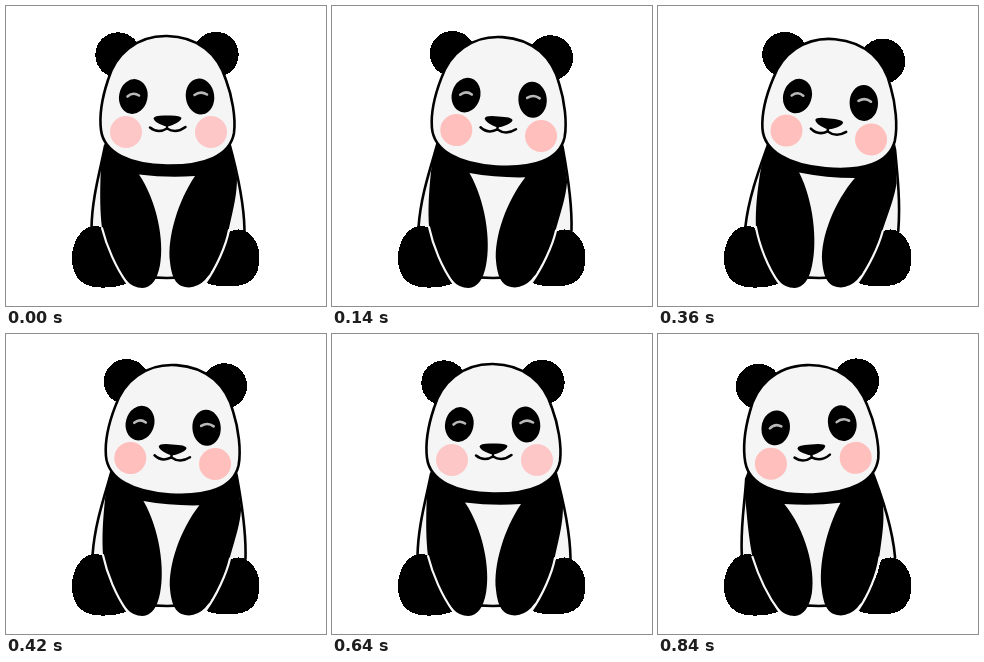
An HTML page that plays this animation: 320x300 px, repeating every 0.98 s.

```html
<!DOCTYPE html>
<html lang="en">
<head>
<meta charset="utf-8">
<title>Swaying panda</title>
<style>
  html, body { margin: 0; width: 100%; height: 100%; overflow: hidden; background: #fff; }
  svg { display: block; width: 320px; height: 300px; }
  .crisp { shape-rendering: crispEdges; }
  .skin { fill: #f5f5f6; stroke: #000; stroke-width: 2.6; }
  .line { fill: none; stroke-linecap: round; stroke-linejoin: round; }
  .gap { stroke: #f8f8f8; stroke-width: 2.2; }
  .mouth { stroke: #000; stroke-width: 2.5; }
  .glint { stroke: #b9b9b9; stroke-width: 2.6; }
</style>
</head>
<body>
<svg viewBox="0 0 320 300">
  <path class="skin bend" d="M108,124 L99,140 C94,165 86,192 85.500,222 L96,262 Q160,282 228,262 L238.500,224 C238,195 231,165 223,136 L217,122 Z"/>

  <!-- legs stay planted -->
  <g class="crisp">
    <path d="M97,222 C81,214 66,231 66,252 C66,274 79,281.500 95,281.500 Q112,282 121,277 C110,262 101,240 97,222 Z"/>
    <path d="M223,226 C239,217 253.500,233 253.500,251 C253.500,272 243,279.500 228,280 Q210,281 200,277 C210,262 220,242 223,226 Z"/>
  </g>

  <!-- collar and both arms -->
  <path class="bend" d="M108,124 L99,140 C95,152 95,160 94.500,172 C94,190 94,205 96,222 C101,240 110,262 120,274 Q127,282 136.500,282 Q150,281 154,259 C158.500,235 151,195 133,168.500 Q161,172 189,170 C172,195 161,232 164,256 C166,275 172,281 183,281.500 Q192,281 199,274 C210,262 220,240 223,222 C228,200 231,188 231,172 L223,136 L217,122 Z"/>
  <path class="line gap bend" d="M96,222 C100.500,240 110,262 121,277"/>
  <path class="line gap bend" d="M223,224 C220,240 210,262 200,276"/>

  <g id="shell">
    <g class="crisp">
      <circle cx="112" cy="49" r="22.700"/>
      <circle cx="210" cy="48.500" r="22.700"/>
    </g>
    <path class="skin" d="M161,30 C130,29.500 109,49 102,74 C96,92 93,108 95,124 C98,147 124,159 161,159.500 C198,160 224,150 228,127 C230,112 226,90 220,74 C212,48 192,30.500 161,30 Z"/>
  </g>

  <g id="face">
    <g id="cheeks">
      <circle cx="120" cy="126" r="16"/>
      <circle cx="205" cy="126" r="16"/>
    </g>
    <ellipse cx="127.300" cy="90.500" rx="14.200" ry="17.500" transform="rotate(12 127.300 90.500)"/>
    <ellipse cx="194" cy="90.500" rx="14.200" ry="18" transform="rotate(-8 194 90.500)"/>
    <path class="line glint" d="M121.500,90.500 Q127,85.500 133,89.500 M188.500,89 Q194.500,84.500 201,88.500"/>
    <path d="M147.500,112.500 Q148,109 161,109.500 Q174.500,109 175.500,112 Q175,115.500 166.500,119 Q161,121.500 156,119 Q148.500,116 147.500,112.500 Z"/>
    <path class="line mouth" d="M144,121.500 Q152,128 161,122.500 Q170,128 179.500,121 M161,118 V122.500"/>
  </g>
</svg>
<script>
  const HOLD = 140;
  const FLOOR = 272;
  // [tilt in degrees, shift x, shift y]
  const rest = [0, 0, 0], halfRight = [4, 6, 1];
  const poses = [rest, halfRight, [6, 11, 3], halfRight, rest, [-6, -14, 3], [-4, -9, 1]];

  const $ = id => document.getElementById(id);
  const bends = [...document.querySelectorAll('.bend')]
    .map(el => ({ el, d: el.getAttribute('d') }));

  // The torso leans more the higher a point lies above the floor.
  function bend(d, tilt, dx) {
    return d.replace(/([\d.]+),([\d.]+)/g, (_, px, py) => {
      const x = +px, y = +py;
      const lean = Math.max(0, (FLOOR - y) / 102) ** 2;
      const drop = 0.7 * tilt * Math.PI / 180 * (x - 161) * lean;
      return `${(x + 0.72 * dx * lean).toFixed(2)},${(y + drop).toFixed(2)}`;
    });
  }

  function show([tilt, dx, dy]) {
    const move = angle => `translate(${dx} ${dy}) rotate(${angle} 161 100)`;
    $('face').setAttribute('transform', move(tilt));
    $('shell').setAttribute('transform', move(tilt * 0.7));
    $('cheeks').setAttribute('fill', tilt ? '#ffbfbd' : '#fdc7c8');
    for (const { el, d } of bends) el.setAttribute('d', bend(d, tilt, dx));
  }

  let current = -1;
  function tick() {
    const step = Math.floor(performance.now() / HOLD) % poses.length;
    if (step !== current) show(poses[current = step]);
    requestAnimationFrame(tick);
  }
  tick();
</script>
</body>
</html>
```
